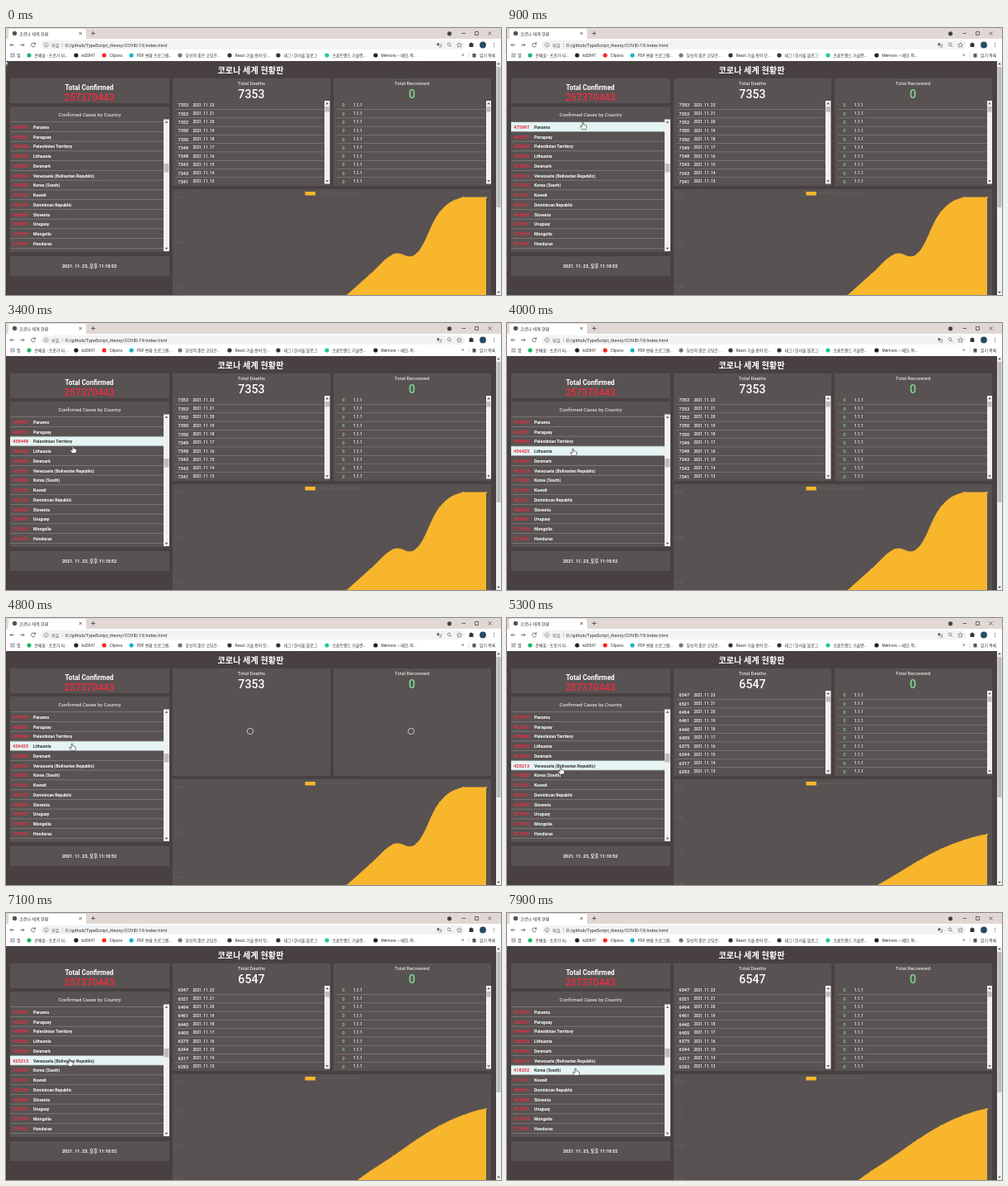
These frames come from a looping animation (600x323 px, 8 s). An HTML page:

```html
<!DOCTYPE html>
<html lang="ko">
<head>
<meta charset="utf-8">
<title>코로나 세계 현황판</title>
<style>
html, body { margin: 0; width: 100%; height: 100%; overflow: hidden; background: #494141; }
svg { display: block; width: 100vw; height: 100vh; }
text { font-family: Roboto, "Noto Sans CJK KR", "Noto Sans CJK", sans-serif; dominant-baseline: central; white-space: pre; }
</style>
</head>
<body>
<svg id="stage" viewBox="0 0 600 323" xmlns="http://www.w3.org/2000/svg"></svg>
<script>
const LOOP = 8000, STEP = 100;
const CLICK = 4500, LOADED = 4900, GROW = 1000;
const PANEL = '#585252', RED = '#ee2c40', GREEN = '#7fd892', ORANGE = '#f8b62d', RULE = '#918b8b';
const ROW_TOP = 113.8, ROW_H = 11.75;

const countries = [
  [475997, 'Panama'], [462331, 'Paraguay'], [458448, 'Palestinian Territory'],
  [456425, 'Lithuania'], [454369, 'Denmark'], [425213, 'Venezuela (Bolivarian Republic)'],
  [418252, 'Korea (South)'], [413161, 'Kuwait'], [402131, 'Dominican Republic'],
  [402093, 'Slovenia'], [397891, 'Uruguay'], [377674, 'Mongolia'], [377481, 'Honduras']
];
const days = [23, 21, 20, 19, 18, 17, 16, 15, 14, 13];
const before = {
  deaths: [7353, 7353, 7352, 7350, 7350, 7349, 7348, 7343, 7343, 7341],
  curve: [348, 323, 298, 274, 273, 223, 205, 205], ticks: [205, 259.5, 314]
};
const after = {
  deaths: [6547, 6521, 6494, 6461, 6440, 6405, 6375, 6344, 6317, 6293],
  curve: [351, 332, 312.5, 294, 274.5, 257.5, 245, 237], ticks: [205, 241, 282, 322]
};
// time, pointer x, pointer y
const track = [
  [0, -2, 38], [300, 18, 60], [900, 92, 114], [1300, 99, 120], [1900, 97, 119.5], [2100, 97, 119.5],
  [2700, 88, 134], [3400, 81, 148.8], [3900, 80, 152], [4900, 80, 152], [5300, 65, 180.5],
  [5900, 64, 180], [6500, 70, 171], [7000, 76, 175], [7800, 83, 188], [8000, 83, 188]
];

const rect = (x, y, w, h, fill, extra = '') =>
  `<rect x="${x}" y="${y}" width="${w}" height="${h}" fill="${fill}" ${extra}/>`;
const label = (x, y, size, content, fill = '#fff', anchor = 'start', weight = 400) =>
  `<text x="${x}" y="${y}" font-size="${size}" fill="${fill}" text-anchor="${anchor}" font-weight="${weight}">${content}</text>`;
const dot = (x, y, r, fill) => `<circle cx="${x}" cy="${y}" r="${r}" fill="${fill}"/>`;
const line = (d, color, width = 0.8) =>
  `<path d="${d}" fill="none" stroke="${color}" stroke-width="${width}"/>`;
const shape = (d, fill) => `<path d="${d}" fill="${fill}"/>`;

function scrollbar(x, top, bottom, thumbTop, thumbH, w = 6.5) {
  const c = x + w / 2;
  return rect(x, top, w, bottom - top, '#f1f1f1') +
    rect(x + 0.5, thumbTop, w - 1, thumbH, '#bdbdbd') +
    shape(`M${c - 1.8} ${top + 4.2}h3.6l-1.8-2.2zM${c - 1.8} ${bottom - 4.2}h3.6l-1.8 2.2z`, '#505050');
}

function browser() {
  const ink = '#5c5c5c';
  const marks = [
    [28, '#1fb66b', '온배움 - 프로가 되...'], [85, '#222', 'kd2847'], [119, '#f22', 'Clipora'],
    [152, '#16b5c4', 'PDF 변환 프로그램...'], [211, '#777', '당신의 좋은 코딩은...'],
    [271, '#333', 'React 기술 용어 모...'], [330, '#333', '태그 | 한서율 블로그'],
    [389, '#20c997', '프론트엔드 기술면...'], [448, '#222', 'Memora – 메모, 작...']
  ];
  let s = rect(0, 0, 600, 14, '#e1d8d4') + rect(0, 13, 600, 27, '#fff') +
    shape('M3 14V3q0-2 2-2H95q2 0 2 2V14z', '#fff') +
    dot(10.5, 6.5, 2.7, '#555') + label(16, 6.5, 5.1, '코로나 세계 현황', '#333') +
    line('M88.8 5l3 3m0-3l-3 3M103.2 6.5h5m-2.5-2.5v5', '#444', 0.8) +
    dot(537.5, 6.8, 2.6, '#444') + line('M552.5 6.5h4.5M568.5 4.5h4v4h-4zM584.5 4.5l4 4m0-4l-4 4', '#444', 0.8) +
    line('M10 20.5H5m2-2l-2 2l2 2M17 20.5h5m-2-2l2 2l-2 2', ink) +
    line('M35.2 19a2.5 2.5 0 1 0 .2 2.5M35.6 17.3v2.2h-2.2', ink) +
    rect(42, 15, 514, 11, '#f1f3f4', 'rx="5.5"') +
    line('M48.5 18a2.5 2.5 0 1 0 .1 0M48.5 20v2', ink, 0.6) +
    label(55, 20.5, 5.1, '파일', ink) + line('M68.5 18v5', '#aaa', 0.5) +
    label(72, 20.5, 5.55, 'D:/github/TypeScript_theory/COVID-19/index.html', '#333') +
    rect(522.5, 18.3, 2.6, 3, ink) + line('M525.5 20h2v3h-3', ink, 0.6) +
    line('M537 18a1.8 1.8 0 1 0 .1 0M538.4 21.2l1.6 1.6', ink, 0.7) +
    line('M549.5 17.7l.9 1.9l2.1.2l-1.6 1.4l.5 2.1l-1.9-1.1l-1.9 1.1l.5-2.1l-1.6-1.4l2.1-.2z', ink, 0.6) +
    shape('M561.5 18.5h1.4a1 1 0 0 1 2 0h1.5v4.6h-4.9z', '#333') +
    dot(578, 20.5, 3.9, '#284b63') + [18.5, 20.5, 22.5].map(y => dot(591.5, y, 0.6, ink)).join('');
  const appColors = ['#e34', '#3a6', '#47c'];
  for (let i = 0; i < 9; i++) s += rect(5.5 + i % 3 * 1.8, 30.6 + Math.floor(i / 3) * 1.8, 1.2, 1.2, appColors[i % 3]);
  s += label(13, 33, 4.9, '앱', '#333');
  for (const [x, color, name] of marks) s += dot(x, 33, 2.6, color) + label(x + 6.5, 33, 4.9, name, '#333');
  return s + label(552, 32.5, 7, '»', ink) + line('M561 30v6', '#bbb', 0.5) +
    rect(565.5, 31, 4, 4.5, '#555') + label(574, 33, 4.9, '읽기 목록', '#333');
}

function dashboard() {
  return rect(0, 40, 600, 283, '#494141') +
    label(296.5, 51, 10.2, '코로나 세계 현황판', '#fff', 'middle', 700) +
    [[5, 61, 193, 30], [5, 95, 193, 176], [5, 276, 193, 24], [202, 61, 191, 130],
     [397, 61, 191, 130], [202, 195, 386, 130]].map(b => rect(...b, PANEL)).join('') +
    label(101, 71.7, 8.2, 'Total Confirmed', '#fff', 'middle', 700) +
    label(101, 84.4, 11.9, '257370443', RED, 'middle', 500) +
    label(101.5, 104.3, 6, 'Confirmed Cases by Country', '#fff', 'middle') +
    label(101, 288.3, 5.4, '2021. 11. 23, 오후 11:10:52', '#fff', 'middle', 700) +
    label(297.5, 66.8, 5.9, 'Total Deaths', '#fff', 'middle') +
    label(492, 66.8, 5.9, 'Total Recovered', '#fff', 'middle') +
    label(492, 80, 14.2, '0', GREEN, 'middle', 500) +
    scrollbar(191, 110.5, 270, 164, 10.5, 7) + scrollbar(594, 40, 323, 47, 170, 6);
}

function countryRows(hover) {
  let s = rect(5, ROW_TOP - 0.5, 186, 0.6, RULE);
  countries.forEach(([count, name], i) => {
    const top = ROW_TOP + i * ROW_H, y = top + 6, on = i === hover;
    if (on) s += rect(5, top + 0.2, 186, ROW_H - 0.4, '#e3f4f3');
    s += label(8, y, 5.6, count, RED, 'start', 600) +
      label(33, y, 5.2, name, on ? '#333' : '#fff', 'start', 600) +
      rect(5, top + ROW_H - 0.5, 186, 0.6, RULE);
  });
  return s;
}

function dailyLists(deaths) {
  let s = '';
  days.forEach((day, i) => {
    const y = 93.4 + i * 10.28;
    s += label(208.5, y, 5.5, deaths[i], '#fff', 'start', 500) + label(226.5, y, 4.6, `2021. 11. ${day}`, '#fff', 'start', 500) +
      label(409, y, 5.5, '0', GREEN, 'middle', 500) + label(421, y, 4.8, '1.1.1', '#fff', 'start', 500);
    if (i < 9) s += rect(206, y + 4.9, 180, 0.5, RULE) + rect(401, y + 4.9, 181, 0.5, RULE);
  });
  return s + scrollbar(386, 88, 188.5, 95, 6.5) + scrollbar(582, 88, 188.5, 95, 6.5, 6);
}

function spinners() {
  return [296, 491].map(x => `<circle cx="${x}" cy="137" r="3.7" fill="none" stroke="#c9c6c6" stroke-width="1"/>`).join('');
}

function chart({ curve, ticks }, growth) {
  const gap = 28.08, base = 430, pull = 0.2;
  const pts = curve.map((y, i) => [582 - (curve.length - 1 - i) * gap, base - (base - y) * growth]);
  const slope = i => (pts[Math.min(i + 1, pts.length - 1)][1] - pts[Math.max(i - 1, 0)][1]) * pull;
  let d = `M${pts[0]}`;
  for (let i = 1; i < pts.length; i++) {
    const [x0, y0] = pts[i - 1], [x, y] = pts[i];
    d += `C${x0 + gap * pull * 2} ${Math.max(205, y0 + slope(i - 1))} ${x - gap * pull * 2} ${Math.max(205, y - slope(i))} ${x} ${y}`;
  }
  let s = '';
  for (let i = 0; i <= 13; i++) s += rect(582 - i * gap, 205, 0.5, 120, '#524c4c');
  ticks.forEach((y, i) => {
    s += rect(214, y, 368, 0.5, '#524c4c') + label(215, y, 3.6, `${480 - i * 10},000`, '#696363', 'end');
  });
  return s + rect(362.5, 198, 12.5, 4.5, ORANGE) +
    label(378, 200, 3.5, 'Confirmed for the last two weeks', '#6b6565') +
    shape(`${d}V430H${pts[0][0]}z`, ORANGE) + line(d, ORANGE, 0.9) +
    pts.map(([x, y]) => dot(x, y, 1, ORANGE)).join('');
}

function pointer(x, y, hand) {
  const d = hand
    ? 'M-.8 .5Q0-.6 .8 .5V3.1Q1.8 2.6 2.2 3.4Q3.2 3 3.5 3.9Q4.6 3.7 4.6 4.8V6.3L3.6 8.6H-.8L-3 5.6Q-3.2 4.2-1.9 4.6L-.8 5.5z'
    : 'M0 0V7.5L1.8 5.9L3 8.5L4.2 8L3.1 5.4H5.4z';
  return `<path transform="translate(${x} ${y})" d="${d}" fill="#fff" stroke="#222" stroke-width=".6"/>`;
}

function pointerAt(t) {
  const i = Math.max(1, track.findIndex(p => p[0] >= t));
  const [t0, x0, y0] = track[i - 1], [t1, x1, y1] = track[i];
  const k = (t - t0) / (t1 - t0);
  return [x0 + (x1 - x0) * k, y0 + (y1 - y0) * k];
}

const stage = document.getElementById('stage');
stage.innerHTML = dashboard() + '<g id="live"></g>' + browser() + '<g id="mouse"></g>';
const live = document.getElementById('live'), mouse = document.getElementById('mouse');

function draw(t) {
  const [x, y] = pointerAt(t);
  const row = x > 5 && x < 191 ? Math.floor((y - ROW_TOP) / ROW_H) : -1;
  const loaded = t >= LOADED, loading = t >= CLICK && !loaded;
  const data = loaded ? after : before;
  const growth = loaded ? 1 - (1 - Math.min(1, (t - LOADED) / GROW)) ** 4 : 1;
  live.innerHTML = countryRows(row) + label(297.5, 80, 14.2, data.deaths[0], '#fff', 'middle', 500) +
    (loading ? spinners() : dailyLists(data.deaths)) + chart(data, growth);
  mouse.innerHTML = pointer(x, y, row >= 0);
}

const start = performance.now();
let shown = -1;
function tick() {
  const t = Math.floor((performance.now() - start) % LOOP / STEP) * STEP;
  if (t !== shown) draw(shown = t);
  requestAnimationFrame(tick);
}
tick();
</script>
</body>
</html>
```
